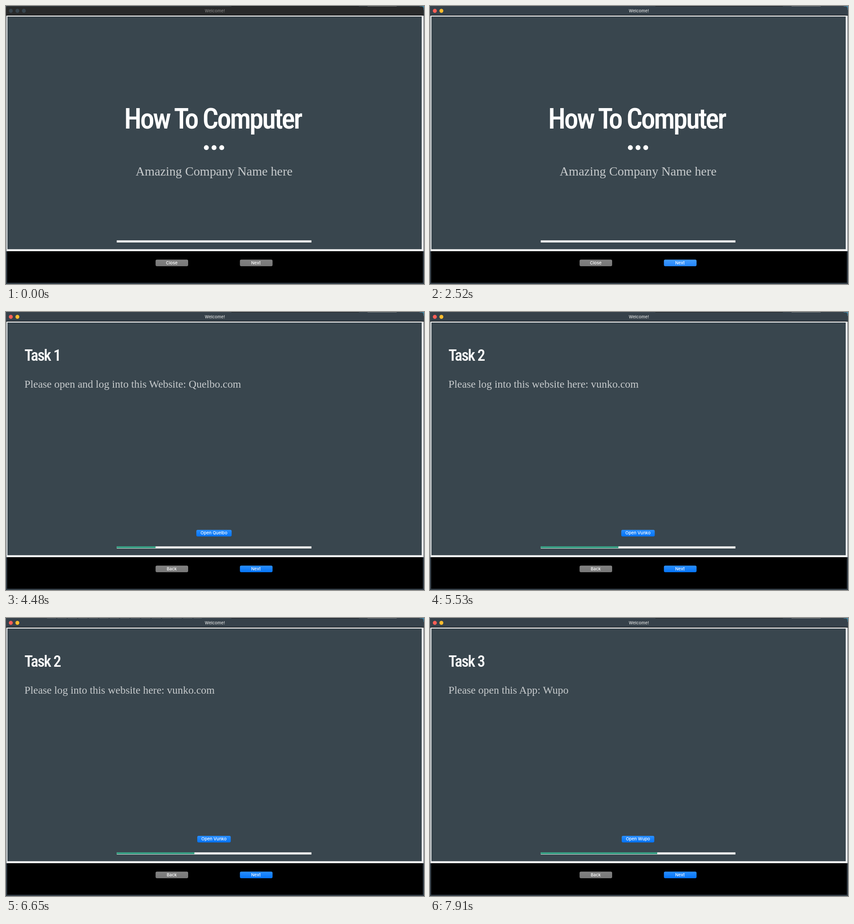
Animation, 918 px wide and 610 px high, one loop 8 s. Source, as an HTML page:

```html
<!DOCTYPE html>
<html lang="en">
<head>
<meta charset="utf-8">
<title>Welcome!</title>
<style>
  html, body { margin: 0; width: 100%; height: 100%; overflow: hidden; background: #000; }
  svg { display: block; width: 918px; height: 610px; }
  text { white-space: pre; }
  .ui { font: 500 9.4px Inter, sans-serif; fill: #fff; text-anchor: middle; }
  .heading {
    font-family: "Roboto Condensed", Roboto, sans-serif;
    font-weight: 500;
    font-stretch: 75%;
    letter-spacing: -.05em;
    fill: #fff;
  }
  .serif { font-family: "Liberation Serif", serif; fill: #c7cbcd; }
  #bar { font-weight: 600; font-size: 9.2px; }
  [hidden] { display: none; }
</style>
</head>
<body>
<svg viewBox="0 0 918 610">
  <defs>
    <linearGradient id="blue" x2="0" y2="1">
      <stop stop-color="#2a8fff"/><stop offset="1" stop-color="#0473f6"/>
    </linearGradient>
    <linearGradient id="pressed" x2="0" y2="1">
      <stop stop-color="#439dff"/><stop offset="1" stop-color="#2385fa"/>
    </linearGradient>
    <linearGradient id="gray" x2="0" y2="1">
      <stop stop-color="#828282"/><stop offset="1" stop-color="#777"/>
    </linearGradient>
  </defs>

  <!-- window -->
  <rect width="918" height="610" fill="#36414a"/>
  <path d="M908 0h10v9z" fill="#4386a4"/>
  <path id="titlebar" d="M0 21V6q0-5 5-5H912q5 0 5 5V21z"/>
  <path d="M495 .5H775" stroke="#1b2023"/>
  <path d="M794 .5H858" stroke="#777c7f"/>
  <path id="backdrop" d="M90 .5H430" stroke="#5a656b" stroke-dasharray="20 3"/>
  <path d="M0 20.5H918" stroke="#0d0f10"/>
  <g id="lights">
    <circle cx="10.6" cy="10.6" r="4.3"/>
    <circle cx="25" cy="10.6" r="4.3"/>
    <circle cx="39.2" cy="10.6" r="4.3"/>
  </g>
  <circle id="hover" cx="10.7" cy="10.7" r="1.5" fill="#962a27"/>
  <text id="bar" class="ui" x="458.7" y="13.6">Welcome!</text>
  <rect x="2.5" y="538" width="913" height="69.3" fill="#000"/>
  <rect x="1" y="21" width="916" height="517" fill="#fff"/>
  <rect x="3" y="23" width="910" height="510.7" fill="#39464e"/>

  <!-- slides -->
  <g id="cover">
    <text id="title" class="heading" x="454" y="269" text-anchor="middle">How To Computer</text>
    <g fill="#fff">
      <circle cx="440" cy="310.7" r="5.4"/>
      <circle cx="456.9" cy="310.7" r="5.4"/>
      <circle cx="473.8" cy="310.7" r="5.4"/>
    </g>
    <text class="serif" x="457" y="372" font-size="27.75" text-anchor="middle">Amazing Company Name here</text>
  </g>
  <g id="task">
    <text id="taskName" class="heading" x="40.5" y="106.5"></text>
    <text id="taskText" class="serif" x="40.5" y="166.4" font-size="23.4"></text>
    <rect id="openBox" y="478" height="14.5" rx="3" fill="url(#blue)"/>
    <text id="openLabel" class="ui" x="456.7" y="488.3"></text>
  </g>
  <rect x="243.2" y="514.2" width="427.6" height="4.7" fill="#f3f3f1"/>
  <rect id="progress" x="243.2" y="514.2" height="3.8" fill="#2a987b"/>

  <!-- navigation -->
  <rect x="328.5" y="556.5" width="71.5" height="14.5" rx="3" fill="url(#gray)"/>
  <text id="backLabel" class="ui" x="364" y="566.7"></text>
  <rect id="nextBox" x="513.7" y="556.5" width="71.7" height="14.5" rx="3"/>
  <text class="ui" x="549" y="566.7">Next</text>
</svg>
<script>
const LOOP = 8000;
const $ = id => document.getElementById(id);
const set = (id, attrs) => {
  for (const name in attrs) $(id).setAttribute(name, attrs[name]);
};
const show = (id, on) => $(id).toggleAttribute('hidden', !on);

const tasks = [
  null,
  { text: 'Please open and log into this Website: Quelbo.com', open: 'Open Quelbo', width: 77.5 },
  { text: 'Please log into this website here: vunko.com', open: 'Open Vunko', width: 73.5 },
  { text: 'Please open this App: Wupo', open: 'Open Wupo', width: 71.5 }
];

// Each step changes only the listed parts of the state.
const steps = [
  [0, { slide: 0, active: false, hover: false, next: 'gray', backdrop: false }],
  [1470, { active: true, hover: true }],
  [1540, { hover: false, next: 'blue' }],
  [2520, { next: 'pressed' }],
  [2870, { slide: 1, next: 'blue' }],
  [5180, { next: 'pressed' }],
  [5530, { slide: 2, next: 'blue' }],
  [6650, { backdrop: true }],
  [6790, { next: 'pressed' }],
  [7000, { backdrop: false }],
  [7140, { slide: 3, next: 'blue' }]
];

// Pick the type size at which the title spans its column; task names follow it.
function sizeHeadings() {
  const title = $('title');
  title.style.fontSize = '100px';
  const size = Math.min(69, 100 * 389 / title.getComputedTextLength());
  title.style.fontSize = size + 'px';
  $('taskName').style.fontSize = size * .56 + 'px';
}

function draw({ slide, active, hover, next, backdrop }) {
  set('titlebar', { fill: active ? '#36414a' : '#292a2b' });
  set('bar', { style: `fill:${active ? '#c9cccd' : '#777'}` });
  const colors = active ? ['#ff5f57', '#febc2e', '#36414a'] : Array(3).fill('#38454e');
  [...$('lights').children].forEach((light, i) => light.setAttribute('fill', colors[i]));
  show('hover', hover);
  show('backdrop', backdrop);
  show('cover', slide === 0);
  show('task', slide > 0);
  set('progress', { width: slide * 85.3 });
  set('nextBox', { fill: `url(#${next})` });
  $('backLabel').textContent = slide ? 'Back' : 'Close';
  if (!slide) return;
  const { text, open, width } = tasks[slide];
  $('taskName').textContent = 'Task ' + slide;
  $('taskText').textContent = text;
  $('openLabel').textContent = open;
  set('openBox', { x: 456.8 - width / 2, width });
}

const start = performance.now();
let current = -1;
function frame() {
  const time = (performance.now() - start) % LOOP;
  const index = steps.filter(([at]) => at <= time).length - 1;
  if (index !== current) {
    current = index;
    draw(Object.assign({}, ...steps.slice(0, index + 1).map(([, change]) => change)));
  }
  requestAnimationFrame(frame);
}

sizeHeadings();
frame();
</script>
</body>
</html>
```
